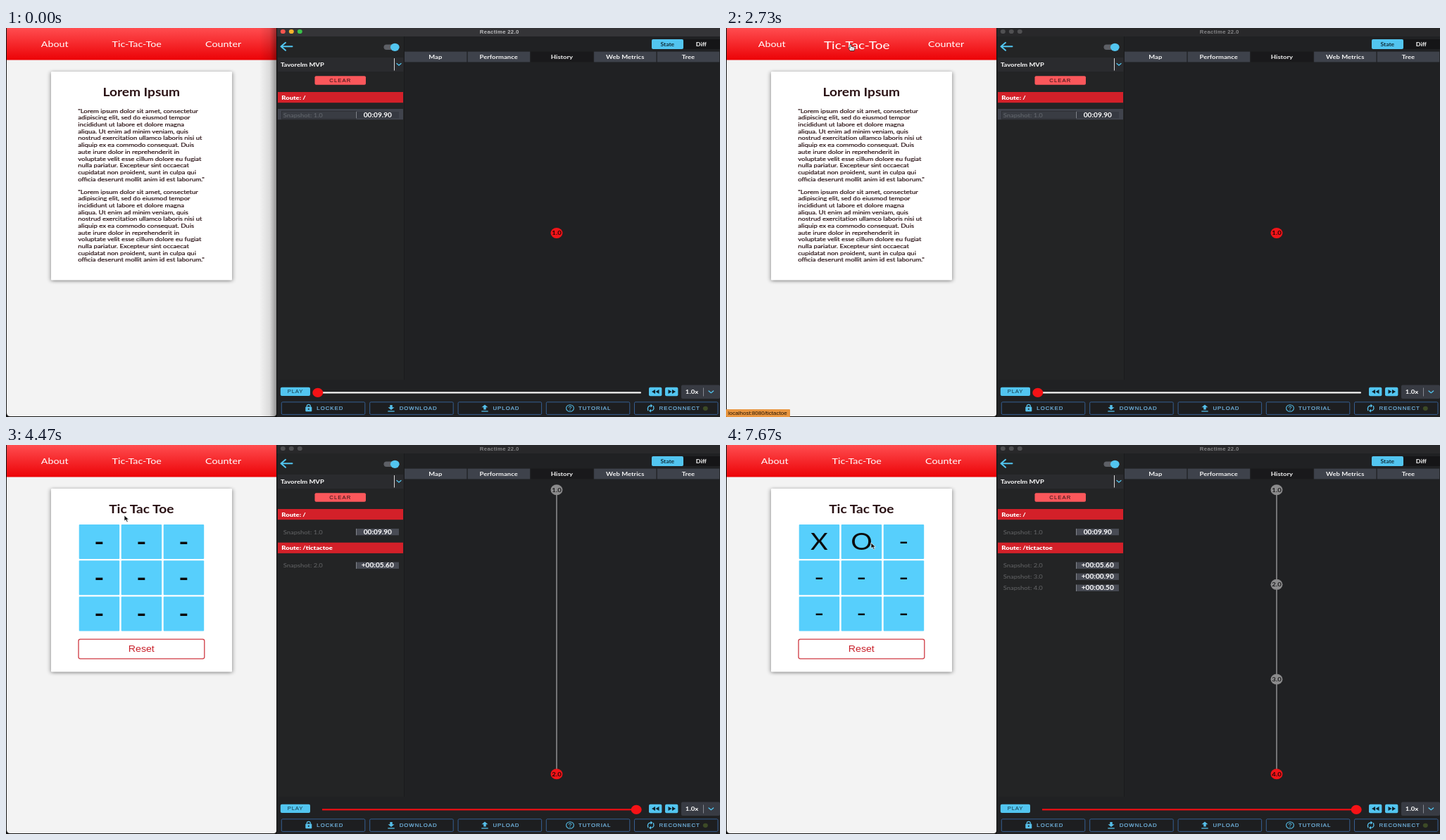
An HTML page that plays this animation: 1014x553 px, repeating every 8 s.

```html
<!DOCTYPE html>
<html lang="en">
<head>
<meta charset="utf-8">
<title>Time travel demo</title>
<style>
html, body { margin: 0; width: 100%; height: 100%; overflow: hidden; background: #1f2022; }
svg { display: block; width: 1014px; height: 553px; }
text { white-space: pre; }
</style>
</head>
<body>
<svg id="stage" viewBox="0 0 1014 553" xmlns="http://www.w3.org/2000/svg">
  <defs>
    <linearGradient id="nav" x2="0" y2="1">
      <stop offset="0" stop-color="#ff4d50"/><stop offset="1" stop-color="#ec0206"/>
    </linearGradient>
    <linearGradient id="shade">
      <stop offset="0" stop-color="#000" stop-opacity="0"/>
      <stop offset=".6" stop-color="#000" stop-opacity=".1"/>
      <stop offset="1" stop-color="#000" stop-opacity=".4"/>
    </linearGradient>
    <filter id="soft" x="-10%" y="-10%" width="120%" height="120%"><feGaussianBlur stdDeviation="3.4 2.8"/></filter>
  </defs>
  <g id="page"></g><g id="links"></g><g id="status"></g>
  <g id="panel"></g><g id="title"></g><g id="live"></g>
  <g id="cursor"></g>
</svg>
<script>
const LOOP = 8000, WIDE = 1.18;     // the whole screen is stretched sideways
const CYAN = '#52c5f0', RED = '#d32029', HOT = '#f01418', INK = '#2a1114';
const LATO = 'Lato, sans-serif', ARIAL = "'Liberation Sans', Arial, sans-serif";

const rect = (x, y, w, h, fill, more = '') =>
  `<rect x="${x}" y="${y}" width="${w}" height="${h}" fill="${fill}" ${more}/>`;
const oval = (x, y, r, fill) => `<ellipse cx="${x}" cy="${y}" rx="${r * 1.13}" ry="${r}" fill="${fill}"/>`;
const line = (d, color, w = 1.5) =>
  `<path d="${d}" fill="none" stroke="${color}" stroke-width="${w}" stroke-linecap="round" stroke-linejoin="round"/>`;
const shape = (d, fill, more = '') => `<path d="${d}" fill="${fill}" ${more}/>`;
const text = (x, y, s, size, fill, o = {}) =>
  `<text transform="matrix(${WIDE} 0 0 1 ${x} ${y})" font-family="${o.font || LATO}" font-size="${size}"
    font-weight="${o.weight || 400}" fill="${fill}" text-anchor="${o.at || 'middle'}"
    letter-spacing="${o.gap || 0}" ${o.more || ''}>${s}</text>`;
const left = { at: 'start' };

const LOREM = `"Lorem ipsum dolor sit amet, consectetur
adipiscing elit, sed do eiusmod tempor
incididunt ut labore et dolore magna
aliqua. Ut enim ad minim veniam, quis
nostrud exercitation ullamco laboris nisi ut
aliquip ex ea commodo consequat. Duis
aute irure dolor in reprehenderit in
voluptate velit esse cillum dolore eu fugiat
nulla pariatur. Excepteur sint occaecat
cupidatat non proident, sunt in culpa qui
officia deserunt mollit anim id est laborum."`.split('\n');

function card(height, heading) {
  return rect(64, 63, 257, height, '#000', 'opacity=".5" filter="url(#soft)"') +
    rect(64, 62, 257, height, '#fff', 'rx="1"') +
    text(192.3, 97, heading, 16.2, INK, { weight: 700 });
}

function paragraph(y) {
  return LOREM.map((s, i) => text(102.3, y + i * 9.69, s, 8.07, INK,
    { at: 'start', more: `stroke="${INK}" stroke-width=".2"` })).join('');
}

function board(marks) {
  let out = '';
  for (let i = 0; i < 9; i++) {
    const x = 103.7 + i % 3 * 60, y = 113 + Math.floor(i / 3) * 51.2;
    out += rect(x, y, 57.5, 49, '#57cffc', 'rx="1"') +
      text(x + 28.7, y + 35.7, marks[i] || '-', 32.3, '#0b0b0b', { weight: marks ? 400 : 700 });
  }
  return out + rect(103, 276.2, 178.8, 27.6, '#fff', 'rx="2.5" stroke="#cf3a43" stroke-width="1.3"') +
    text(192.3, 294, 'Reset', 12, '#c9202a', { font: ARIAL });
}

function drawPage(s) {
  return rect(0, 0, 386, 553, '#141414') +
    shape('M1 0H384V548Q384 552 380 552H6Q1 552 1 547Z', '#f3f3f3') +
    rect(1, 0, 383, 45.5, 'url(#nav)') +
    (s.game ? card(260.5, 'Tic Tac Toe') + board(s.marks)
            : card(296.5, 'Lorem Ipsum') + paragraph(120.7) + paragraph(235.5)) +
    (s.focus ? '' : rect(360, 0, 24, 553, 'url(#shade)'));
}

function drawLinks(h) {
  const f = '#fff';
  return text(69.2 - 4 * h, 27, 'About', 12.1, f) +
    text(185.7, 27 + 3.4 * h, 'Tic-Tac-Toe', 12.1 + 4 * h, f) +
    text(308.6 + 4 * h, 27, 'Counter', 12.1, f);
}

function footButton(x, label, tx, icon) {
  return rect(x, 531.8, 118.5, 17.6, '#1d1e20', 'rx="1.5" stroke="#365f92" stroke-width="1"') + icon +
    text(tx, 543, label, 6.6, '#74b9e6', { at: 'start', font: ARIAL, gap: .85,
      more: 'stroke="#74b9e6" stroke-width=".2"' });
}

function drawPanel() {
  const dark = { weight: 700 };
  let out = rect(385, 0, 629, 553, '#202123') +
    rect(386, 12, 179, 488, '#232425') +
    rect(386, 42, 178.5, 20, '#2a2b2e') +
    rect(565, 12, 1, 488, '#1a1a1c') +
    line('M406.5 26.3H391M397 20.8 390.5 26.3 397 31.8', CYAN, 2) +
    rect(536.5, 23.6, 18, 7.4, '#5d6066', 'rx="3.7"') + oval(552.3, 27.3, 5.6, CYAN) +
    text(390, 54.8, 'Tavorelm MVP', 8, '#fff', { at: 'start', weight: 700 }) +
    rect(551, 43, 1, 17.5, '#d9d9d9') + line('M555 50.5 558 53 561 50.5', CYAN, 1.3) +
    rect(438.5, 68.3, 72.5, 12.4, '#fb575b', 'rx="2"') +
    text(474.8, 77, 'CLEAR', 6.6, '#2b1012', { font: ARIAL, gap: .85 }) +
    rect(962, 16, 52, 14, '#151517') +
    rect(917, 16, 45, 14, CYAN, 'rx="2"') +
    text(939.3, 25.8, 'State', 7.3, '#12303d', dark) + text(987.3, 25.8, 'Diff', 7.5, '#fff', dark);

  ['Map', 'Performance', 'History', 'Web Metrics', 'Tree'].forEach((s, i) => {
    out += rect(566 + i * 89.7, 33.6, 88.4, 14.8, i == 2 ? '#19191b' : '#3e424b') +
      text(609.8 + i * 89.8, 44, s, 8.05, '#f2f2f2', dark);
  });

  out += rect(389.8, 510.7, 42.2, 12.4, CYAN, 'rx="2"') +
    text(411, 519.3, 'PLAY', 6.6, '#123746', { font: ARIAL, gap: .7 }) +
    rect(913, 510.7, 18.4, 12.6, CYAN, 'rx="2"') + rect(936, 510.7, 18.4, 12.6, CYAN, 'rx="2"') +
    shape('M922 514V520L917 517ZM927.5 514V520L922.5 517ZM940.5 514V520L945.5 517ZM946 514V520L951 517Z', '#10222b') +
    rect(959, 507.5, 55, 19.5, '#383b43', 'rx="2"') +
    text(974, 520.3, '1.0x', 8.1, '#fff', dark) +
    rect(990, 511.5, 1, 12, '#85888f') + line('M998 516 1001.3 518.7 1004.6 516', CYAN, 1.3);

  const c = '#56bfe9';
  out += footButton(391.3, 'LOCKED', 441.3,
      rect(425.3, 538.6, 9, 6.6, c, 'rx="1"') + line('M427.3 538.5V537.5Q427.3 535.3 429.8 535.3T432.3 537.5V538.5', c, 1.2) + oval(429.8, 541.8, 1, '#1d1e20')) +
    footButton(516.7, 'DOWNLOAD', 558.7,
      shape('M545.3 536H548.7V539.3H551.5L547 543 542.5 539.3H545.3Z', c) + rect(542.3, 544.2, 9.4, 1.3, c)) +
    footButton(642.1, 'UPLOAD', 691.5,
      shape('M678.3 542.5H681.7V539.3H684.5L680 535.6 675.5 539.3H678.3Z', c) + rect(675.3, 544.2, 9.4, 1.3, c)) +
    footButton(767.3, 'TUTORIAL', 813,
      `<ellipse cx="801" cy="540.5" rx="5.4" ry="4.7" fill="none" stroke="${c}" stroke-width="1.1"/>` +
      line('M799.3 539.3Q799.3 537.8 801 537.8T802.8 539.2Q802.8 540 801 541.2', c, 1) + oval(801, 543.2, .6, c)) +
    footButton(892.5, 'RECONNECT', 927.6,
      line('M911.8 543.5Q910.2 537 916 537M919.5 537.7Q921.3 544 915.5 544.2', c, 1.3) +
      shape('M915.5 534.6V539.4L918.5 537ZM916 541.8V546.6L913 544.2Z', c)) +
    oval(993.3, 540.8, 3.1, '#3d4a26');
  return out;
}

function drawTitle(focus) {
  const dots = focus ? ['#505052', '#505052', '#505052'] : ['#f9564f', '#f5b32c', '#3ac24a'];
  return rect(385, 0, 629, 12, focus ? '#28282a' : '#343437') +
    dots.map((c, i) => oval(393.3 + i * 12, 5, 3.1, c)).join('') +
    text(700.7, 7.6, 'Reactime 22.0', 6.6, focus ? '#858587' : '#bdbdbf', { font: ARIAL, weight: 700, gap: .25 });
}

function route(y, path) {
  return rect(386, y, 178, 15.2, RED) +
    text(391.3, y + 10.5, 'Route: ' + path, 8, '#fff', { at: 'start', weight: 900 });
}

function snapshot(i, y, time, lit) {
  return (lit ? rect(386, y - 8.7, 178, 15.2, '#40434c') +
      rect(391.5, y - 5.5, 105.5, 11, '#393c43', 'stroke="#282a2e" stroke-width=".8"') : '') +
    text(393.7, y + 3, `Snapshot: ${i}.0`, 8, lit ? '#666a70' : '#656668', left) +
    rect(497, y - 4.8, 61, 9.4, lit ? '#363941' : '#484b54') +
    rect(497, y - 4.8, 1, 9.4, '#82858c') +
    text(527.8, y + 3, time, 8.6, '#fff', { weight: 700 });
}

function drawLive(s) {
  const times = ['00:09.90', '+00:05.60', '+00:00.90', '+00:00.50'];
  let out = route(91, '/') + (s.count > 1 ? route(138.7, '/tictactoe') : '');
  for (let i = 0; i < s.count; i++)
    out += snapshot(i + 1, i ? 155.3 + 16 * i : 123.7, times[i], s.count == 1);

  if (s.count > 1) out += rect(781, 64, 2, 404, '#747476');
  for (let i = 0; i < s.count; i++) {
    const last = i == s.count - 1;
    const y = s.count == 1 ? 291.5 : 63.7 + 404 * i / (s.count - 1);
    out += oval(782, y, 7.5, last ? HOT : '#8b8b8c') +
      text(782, y + 2.9, `${i + 1}.0`, 8.1, last ? '#2c0305' : '#1d1d1e', { weight: 700 });
  }

  const knob = 442.8 + 452.4 * (s.count > 1 ? s.index / (s.count - 1) : 0);
  return out + rect(knob, 517.2, 902 - knob, 2.2, '#f5f5f5', 'rx="1"') +
    rect(449, 517.2, Math.max(0, knob - 449), 2.2, '#f00f13') + oval(knob, 518.4, 6.6, '#f51216');
}

const STATUS = rect(0, 542, 91, 11, '#e8953f', 'rx="1"') +
  text(3, 550, 'localhost:8080/tictactoe', 6.8, '#221405', { at: 'start', font: ARIAL });
const ARROW = shape('M0 0V8L2.1 6.3 3.7 9.5 5.2 8.9 3.7 5.9H6.4Z', '#0a0a0a', 'stroke="#fff" stroke-width=".7"');
const HAND = shape('M-1 .8Q0-.6 1 .8V3.5L5 4.3Q6.2 4.7 5.9 6.2L5 9.5H-.5L-3.2 6Q-3.3 4.7-2 5.1L-1 6Z', '#fff', 'stroke="#111" stroke-width=".8"') +
  line('M1.6 6.3V8M3.4 6.3V8', '#333', .5);

// time, x, y of the pointer tip
const PATH = [
  [930, 290, 250], [1600, 175, 40], [1800, 170, 30.5], [1900, 170, 30.5],
  [2200, 177, 23], [2900, 177, 23], [3260, 182, 63.5], [3480, 182, 63.5],
  [3730, 167, 88], [3930, 168, 100], [4500, 168, 100], [4870, 137, 130],
  [5300, 136, 137], [6400, 136, 137], [7070, 200, 139], [7130, 206, 139], [8000, 206, 139]
];
const ease = p => p * p * (3 - 2 * p);
const ramp = (t, a, b) => Math.min(1, Math.max(0, (t - a) / (b - a)));

function pointer(t) {
  const i = PATH.findIndex(k => k[0] > t);
  if (i < 1) return null;
  const [a, b] = [PATH[i - 1], PATH[i]], p = ease(ramp(t, a[0], b[0]));
  return [a[1] + (b[1] - a[1]) * p, a[2] + (b[2] - a[2]) * p];
}

// time, snapshot count, slider index
const STEPS = [[0, 1, 0], [2930, 2, 0], [3000, 2, 1], [6270, 3, 1], [6330, 3, 2], [7600, 4, 2], [7670, 4, 3]];

function stateAt(t) {
  const [, count, index] = STEPS.filter(s => s[0] <= t).pop();
  return { count, index, focus: t >= 930, game: t >= 2870, marks: ['', '', '', 'X', 'XO'][count] };
}

const seen = {};
function put(id, key, draw) {
  if (seen[id] === key) return;
  seen[id] = key;
  document.getElementById(id).innerHTML = draw();
}

function render(t) {
  const s = stateAt(t);
  const hover = ease(ramp(t, 1950, 2200) - ramp(t, 3020, 3220));
  const status = t >= 2070 && t < 3730;
  const over = t >= 1950 && t < 3020;
  put('page', [s.game, s.marks, s.focus].join(), () => drawPage(s));
  put('links', hover, () => drawLinks(hover));
  put('status', status, () => status ? STATUS : '');
  put('panel', 1, drawPanel);
  put('title', s.focus, () => drawTitle(s.focus));
  put('live', [s.count, s.index].join(), () => drawLive(s));
  const at = pointer(t);
  put('cursor', at ? over : 'none', () => at ? (over ? HAND : ARROW) : '');
  if (at) document.getElementById('cursor').setAttribute('transform', `translate(${at[0]} ${at[1]})`);
}

const start = performance.now();
function tick() {
  render((performance.now() - start) % LOOP);
  requestAnimationFrame(tick);
}
tick();
</script>
</body>
</html>
```
